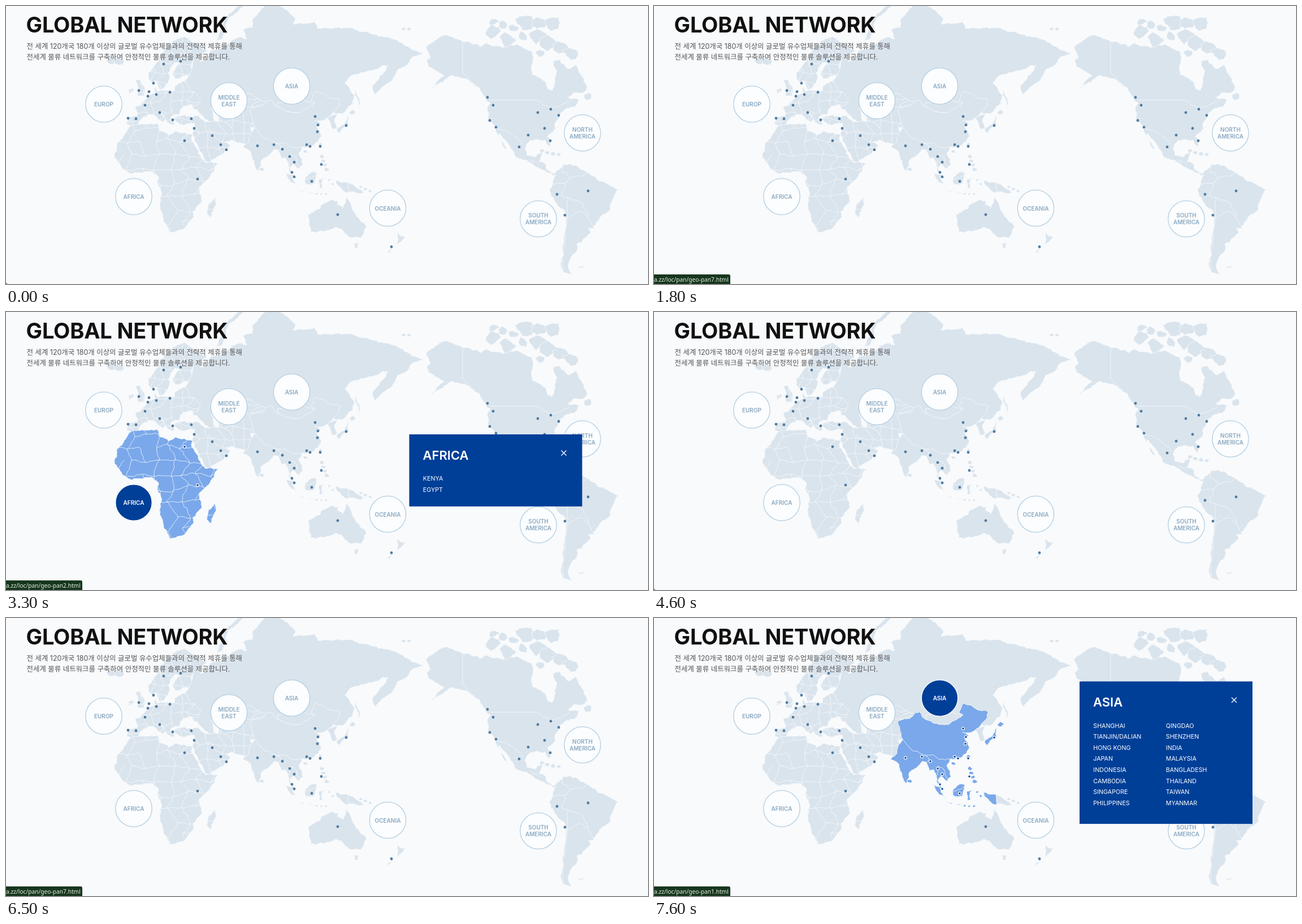
An HTML page that plays this animation: 1136 px wide and 493 px high, repeating every 8 s.

```html
<!DOCTYPE html>
<html lang="ko">
<head>
<meta charset="utf-8">
<title>Global network</title>
<style>
html, body { margin: 0; width: 100%; height: 100%; overflow: hidden; background: #f8fafc; }
svg { display: block; width: 1136px; height: 493px; font-family: Inter, 'Noto Sans CJK KR', 'Noto Sans CJK', sans-serif; }
.land { fill: #dae4ed; stroke: #f8fafc; stroke-width: .8; stroke-linejoin: round; }
.land .border { fill: none; }
.land.on { fill: #7aa8ea; }
.water { fill: #f8fafc; }
.dots { fill: #517c9f; }
.dots.on { fill: #003f98; stroke: #fff; stroke-width: 1.2; }
.badge circle { fill: #fcfdfe; stroke: #b3cee1; stroke-width: 1.3; }
.badge text { fill: #8aa9c2; font-size: 10px; font-weight: 600; text-anchor: middle; }
.badge.on circle { fill: #003f98; stroke: #fff; }
.badge.on text { fill: #fff; }
.popup { display: none; fill: #fff; font-size: 10.7px; }
.popup.on { display: block; }
.popup rect { fill: #003f98; }
.popup path { stroke: #fff; stroke-width: 1.4; }
.popup .name { font-size: 22px; font-weight: 600; }
.title { font-size: 38px; font-weight: 700; letter-spacing: -.2px; fill: #111; }
.lead { font-size: 12.44px; fill: #555; }
.status text { font: 10.2px 'Noto Sans', sans-serif; fill: #e3eee4; }
</style>
</head>
<body>
<svg id="stage" viewBox="0 0 1136 493"></svg>
<script>
const stage = document.getElementById('stage');

function add(parent, tag, attrs = {}, text) {
  const el = document.createElementNS('http://www.w3.org/2000/svg', tag);
  for (const k in attrs) el.setAttribute(k, attrs[k]);
  if (text !== undefined) el.textContent = text;
  parent.append(el);
  return el;
}
const layer = () => add(stage, 'g');
const points = s => s.trim().split(/\s+/).map(p => p.split(',').map(Number));

// Repeatable noise from -.5 to .5, so a shared edge looks the same from both sides
const noise = (x, y) => { const v = Math.sin(x * 12.99 + y * 78.23) * 43758.5; return v - Math.floor(v) - .5; };

function split(a, b, depth) {
  const len = Math.hypot(b[0] - a[0], b[1] - a[1]);
  if (!depth || len < 3.5) return [b];
  const x = (a[0] + b[0]) / 2, y = (a[1] + b[1]) / 2, amp = Math.min(len * .3, 4);
  const m = [x + noise(x, y) * amp, y + noise(y, x) * amp];
  return [...split(a, m, depth - 1), ...split(m, b, depth - 1)];
}
function rough(pts, closed) {
  const ends = closed ? [...pts, pts[0]] : pts;
  const out = ends.flatMap((p, i) => i ? split(ends[i - 1], p, 4) : [p]);
  return 'M' + out.map(p => p.map(v => v.toFixed(1)).join(' ')).join('L') + (closed ? 'Z' : '');
}

const mapLayer = layer(), waterLayer = layer(), dotLayer = layer(), badgeLayer = layer();
const textLayer = layer(), popupLayer = layer(), statusLayer = layer();

const lands = {}, outlines = {};
function shape(key, pts) {
  const d = rough(pts, true);
  lands[key] ||= add(mapLayer, 'g', { class: 'land' });
  outlines[key] = (outlines[key] || '') + d;
  add(lands[key], 'path', { d });
}
const land = (key, ...list) => list.forEach(s => shape(key, points(s)));
const line = (key, d) => add(lands[key], 'path', { class: 'border', d });

// A row of n irregular islands
function isles(key, x1, y1, x2, y2, n, r) {
  for (let i = 0; i < n; i++) {
    const k = n > 1 ? i / (n - 1) : 0, x = x1 + (x2 - x1) * k, y = y1 + (y2 - y1) * k;
    shape(key, Array.from({ length: 7 }, (_, j) => {
      const a = j / 7 * Math.PI * 2, d = r * (1 + noise(x + j, y) * .7);
      return [x + Math.cos(a) * d * 1.2, y + Math.sin(a) * d];
    }));
  }
}

// Country borders: a loose net of cells cut to the outline of the land
function countries(key, size) {
  const clip = add(stage, 'clipPath', { id: 'clip-' + key });
  add(clip, 'path', { d: outlines[key] });
  const box = lands[key].getBBox();
  const node = (i, j) => [
    (i + j % 2 / 2 + noise(i, j) * .5) * size, (j + noise(j, i + 9) * .5) * size];
  let d = '';
  for (let j = Math.floor(box.y / size) - 1; j * size < box.y + box.height + size; j++)
    for (let i = Math.floor(box.x / size) - 1; i * size < box.x + box.width + size; i++) {
      if (noise(i + 3, j) > -.3) d += rough([node(i, j), node(i + 1, j)]);
      if (noise(i, j + 5) > -.35) d += rough([node(i, j), node(i, j + 1)]);
    }
  line(key, d).setAttribute('clip-path', `url(#clip-${key})`);
}

// Northern Asia
land('rest', `316,131 330,108 326,70 331,64 356,80 338,88 344,98 356,93 362,80 385,72 411,56 426,58 420,42 436,38
  436,24 458,0 484,-4 500,10 512,22 508,32 546,28 552,40 590,38 650,50 690,60 738,84 720,90 704,108 694,112 688,124
  653,157 648,142 676,106 648,114 610,124 600,136 616,158 614,174 594,191 560,186 480,190 440,215 362,206 330,178`,
  '370,64 384,26 414,-3 424,-2 394,22 380,60', '618,148 626,166 625,180 619,160', '569,197 588,190 582,199 586,215 577,219 574,209');
isles('rest', 186, 98, 200, 98, 2, 6);
isles('rest', 703, 41, 713, 41, 2, 3);

land('steppe', '376,170 410,158 430,155 462,170 432,184 438,205 432,212 438,232 427,248 403,240 395,211 380,204');
countries('steppe', 23);

land('asia', `432,183 455,176 462,168 470,166 478,178 498,187 520,189 547,172 540,168 549,151 568,160 591,166
  590,177 578,190 561,203 546,203 557,208 550,214 558,230 545,247 524,250 522,257 518,262 526,281 518,290 508,280
  502,289 512,306 506,302 499,280 495,269 487,272 482,256 475,254 452,273 451,284 446,294 440,283 432,258 419,251
  430,240 436,222 440,215`,
  '489,290 507,303 518,323 503,311', '516,325 548,331 535,331',
  '530,303 543,294 550,297 546,315 531,316', '553,308 566,305 559,309 560,322 555,324',
  '583,309 606,314 606,331 588,319', '606,189 613,184 620,188 612,193', '606,195 606,210 588,226 585,218 598,210');
isles('asia', 559, 267, 568, 290, 4, 3.4);
isles('asia', 550, 333, 566, 334, 3, 2);
isles('asia', 572, 309, 578, 316, 2, 2);
isles('asia', 452, 289, 452, 289, 1, 3.5);
isles('asia', 556, 246, 530, 258, 2, 3);
line('asia', rough(points('440,215 455,233 478,243 492,242 503,250 524,250')));
line('asia', rough(points('478,243 487,250 482,258')));
line('asia', rough(points('500,282 502,263 514,270 518,285')));
line('asia', rough(points('530,307 549,299')));
land('rest', '');

land('steppe', '480,178 480,172 506,163 535,170 547,172 535,186 520,189 498,187');

land('europe', `214,197 232,195 228,179 238,177 256,157 262,155 261,143 267,151 297,151 299,142 316,133
  326,150 345,165 340,175 312,180 307,192 291,197 298,210 291,210 272,187 283,200 277,207 260,193 251,193
  236,205 234,211 222,213 214,210`,
  `252,130 252,118 270,97 279,80 303,58 316,54 331,66 322,70 332,95 324,124 299,129 295,121 306,101 298,100
  287,119 290,126 279,147 273,149 265,132 258,137`,
  '234,160 234,148 228,133 236,130 246,152 244,159', '216,157 217,148 225,145 227,152');
countries('europe', 17);

land('mideast', '296,199 315,193 342,196 355,205 380,204 395,210 404,238 388,241 397,246 385,262 358,277 352,275 334,240 330,228 334,208 308,210');
countries('mideast', 25);
line('mideast', rough(points('358,218 366,229 380,240 392,240')));

land('africa', `220,213 267,208 272,221 285,225 288,229 300,222 330,228 328,234 341,262 352,277 375,278
  362,300 343,320 346,348 330,365 332,372 313,396 290,402 271,352 276,332 268,312 270,303 258,293
  220,297 203,283 192,268 197,243 211,226`, '370,339 372,347 362,375 355,367 358,351');
countries('africa', 24);

land('oceania', `536,378 535,370 555,360 562,350 576,343 588,345 586,352 597,358 603,338 616,365 638,392
  628,411 610,411 594,396 583,392 548,402 540,401`, '615,420 624,420 622,429 617,429',
  '692,402 697,407 705,408 692,424', '690,422 678,438 672,438', '606,314 622,323 634,332 606,331');
isles('oceania', 628, 321, 644, 328, 3, 2.5);

land('north', `744,97 751,90 744,72 775,52 808,63 840,72 850,66 880,74 905,68 930,80 933,92 930,105 932,122
  955,134 959,147 966,150 975,115 968,100 980,95 998,112 1008,104 1028,145 1024,152 1005,153 995,163 1014,166
  1006,179 994,181 978,195 971,210 972,216 958,232 963,243 962,250 954,238 928,238 918,252 921,264 937,268
  941,262 950,261 943,276 955,280 957,290 975,297 968,301 930,279 902,268 874,226 872,228 886,255 882,253
  866,217 853,200 852,186 857,172 838,145 808,128 788,123 752,146 775,124 748,108`);
isles('north', 862, 46, 888, 61, 2, 12);
isles('north', 862, 29, 898, 40, 3, 7);
isles('north', 918, 30, 968, 30, 3, 12);
isles('north', 914, 54, 946, 84, 2, 8);
isles('north', 942, 54, 1000, 86, 4, 12);
isles('north', 948, 257, 978, 264, 4, 3.4);
isles('north', 1029, 161, 1029, 161, 1, 6);
line('north', 'M808 63V118L830 140M857 167H940');
line('north', rough(points('940,167 966,182 997,168')));
line('north', rough(points('866,218 888,224 916,246')));
line('north', rough(points('928,272 943,282')));

land('south', `972,296 985,281 1008,283 1030,295 1048,310 1083,325 1072,347 1070,360 1050,376 1040,395 1030,395
  1035,402 1018,420 1010,422 1012,428 1000,445 995,462 1002,476 985,470 981,458 984,430 990,395 990,368
  972,348 961,326 967,318`);
isles('south', 1015, 463, 1020, 463, 2, 1.8);
line('south', rough(points('985,281 983,293 1000,304 1030,296')));
line('south', rough(points('967,315 990,314 1000,304')));
line('south', rough(points('990,314 983,337 995,340 1022,352 1030,374 1044,395')));
line('south', rough(points('995,340 992,378 985,450 987,470')));
line('south', rough(points('993,378 1015,364 1030,374')));

['308,191 314,179 334,183 347,191 325,192', '362,181 372,178 377,204 368,205'].forEach(s =>
  add(waterLayer, 'path', { class: 'water', d: rough(points(s), true) }));

// popup name, badge label, badge centre, popup corner, popup columns, offices
const regions = {
  asia: ['ASIA', 'ASIA', 505.5, 142, 753, 112.5,
    ['SHANGHAI TIANJIN/DALIAN HONG_KONG JAPAN INDONESIA CAMBODIA SINGAPORE PHILIPPINES', 'QINGDAO SHENZHEN INDIA MALAYSIA BANGLADESH THAILAND TAIWAN MYANMAR'],
    '547,196 552,211 551,223 532,246 538,249 556,249 602,212 445,248 474,246 489,254 502,267 510,277 506,295 510,303 541,311 558,281'],
  africa: ['AFRICA', 'AFRICA', 226, 338, 713.5, 217, ['KENYA EGYPT'], '316,239 339,307'],
  europe: ['EUROPE', 'EUROP', 173, 174, 727, 164,
    ['UK GERMANY FRANCE NETHERLANDS BELGIUM ITALY GREECE', 'SPAIN PORTUGAL POLAND SWEDEN FINLAND DENMARK'],
    '279,103 309,98 261,137 235,150 253,152 251,160 266,157 290,153 246,176 272,189 295,202 216,199 230,200'],
  mideast: ['MIDDLE EAST', 'MIDDLE EAST', 394.5, 168, 713.5, 217, ['TURKEY ISRAEL KUWAIT UAE OMAN'],
    '328,200 333,217 365,230 380,246 390,255'],
  north: ['NORTH AMERICA', 'NORTH AMERICA', 1020, 225, 713.5, 217,
    ['VANCOUVER SEATTLE OAKLAND LOS_ANGELES CHICAGO', 'TORONTO NEW_YORK ATLANTA HOUSTON MEXICO'],
    '852,162 862,176 856,203 867,215 908,250 924,229 953,217 963,239 941,189 964,183 978,194'],
  oceania: ['OCEANIA', 'OCEANIA', 675.5, 358.5, 713.5, 217, ['AUSTRALIA NEW_ZEALAND'], '587,370 682,427'],
  south: ['SOUTH AMERICA', 'SOUTH AMERICA', 942, 377.5, 753, 112, ['BRAZIL CHILE PERU ARGENTINA'], '1030,328 975,334 989,371']
};
const rowStep = 19.6;

const parts = {};
for (const key in regions) {
  const [name, label, cx, cy, x, y, columns, offices] = regions[key];
  const dots = add(dotLayer, 'g', { class: 'dots' });
  points(offices).forEach(([px, py]) => add(dots, 'circle', { cx: px, cy: py, r: 2.4 }));

  const badge = add(badgeLayer, 'g', { class: 'badge' });
  add(badge, 'circle', { cx, cy, r: 32.2 });
  const words = label.split(' '), middle = (words.length - 1) / 2;
  words.forEach((s, i) => add(badge, 'text', { x: cx, y: cy + 4.4 - middle * 1.6 + (i - middle) * 12 }, s));

  const popup = add(popupLayer, 'g', { class: 'popup', transform: `translate(${x} ${y})` });
  const lists = columns.map(c => c.split(' '));
  const height = 81 + lists.length * 7.2 + (lists[0].length - 1) * rowStep + 20;
  add(popup, 'rect', { width: 306, height });
  add(popup, 'text', { class: 'name', x: 24, y: 44.5 }, name);
  add(popup, 'path', { d: 'M269 28.5l9 9m0 -9l-9 9' });
  lists.forEach((list, c) => list.forEach((s, i) =>
    add(popup, 'text', { x: 24.3 + c * 128.5, y: 82 + i * rowStep }, s.replace('_', ' '))));

  parts[key] = [lands[key], dots, badge, popup];
}

add(textLayer, 'text', { class: 'title', x: 35.6, y: 46.5 }, 'GLOBAL NETWORK');
add(textLayer, 'text', { class: 'lead', x: 36.5, y: 76 }, '전 세계 120개국 180개 이상의 글로벌 유수업체들과의 전략적 제휴를 통해');
add(textLayer, 'text', { class: 'lead', x: 36.5, y: 95.2 }, '전세계 물류 네트워크를 구축하여 안정적인 물류 솔루션을 제공합니다.');

add(statusLayer, 'path', { d: 'M0 489.5Q.5 492.5 4 493H0Z', fill: '#777' });
const status = add(statusLayer, 'g', { class: 'status' });
add(status, 'path', { d: 'M0 476H132Q135 476 135 479V493H0Z', fill: '#17361d' });
const link = add(status, 'text', { x: 0, y: 488.5 });

// Each visit opens a region and closes it again
const visits = [['north', 400, 1100], ['south', 1300, 1800], ['oceania', 2100, 2500], ['asia', 2500, 2900],
  ['mideast', 3000, 3200], ['africa', 3300, 3700], ['europe', 3700, 4100], ['north', 5200, 5700],
  ['south', 6100, 6500], ['oceania', 6800, 7100], ['asia', 7600, 8000]];
const pages = ['asia', 'africa', 'europe', 'mideast', 'north', 'oceania', 'south'];
// The link bar fades in at the first time and out at the second
const hovers = [[900, 4400], [5400, 5900], [6000, 7400], [7500, 8000]];

function linkOpacity(t) {
  const tick = Math.floor(t / 100) * 100 + 100;
  const shown = hovers.map(([from, to]) => Math.min((tick - from) / 200, 1 - Math.max(0, tick - to) / 300));
  return Math.max(0, ...shown);
}

function draw() {
  const t = performance.now() % 8000;
  const active = visits.find(([, open, close]) => t >= open && t < close)?.[0];
  for (const key in parts) parts[key].forEach(el => el.classList.toggle('on', key === active));

  // The pointer reaches the next link just before its region opens
  const next = visits.findLast(([, open], i) => t >= Math.max(open - 100, i ? visits[i - 1][2] : 0)) || visits[0];
  link.textContent = `a.zz/loc/pan/geo-pan${pages.indexOf(next[0]) + 1}.html`;
  status.setAttribute('opacity', linkOpacity(t));
  requestAnimationFrame(draw);
}
draw();
</script>
</body>
</html>
```
